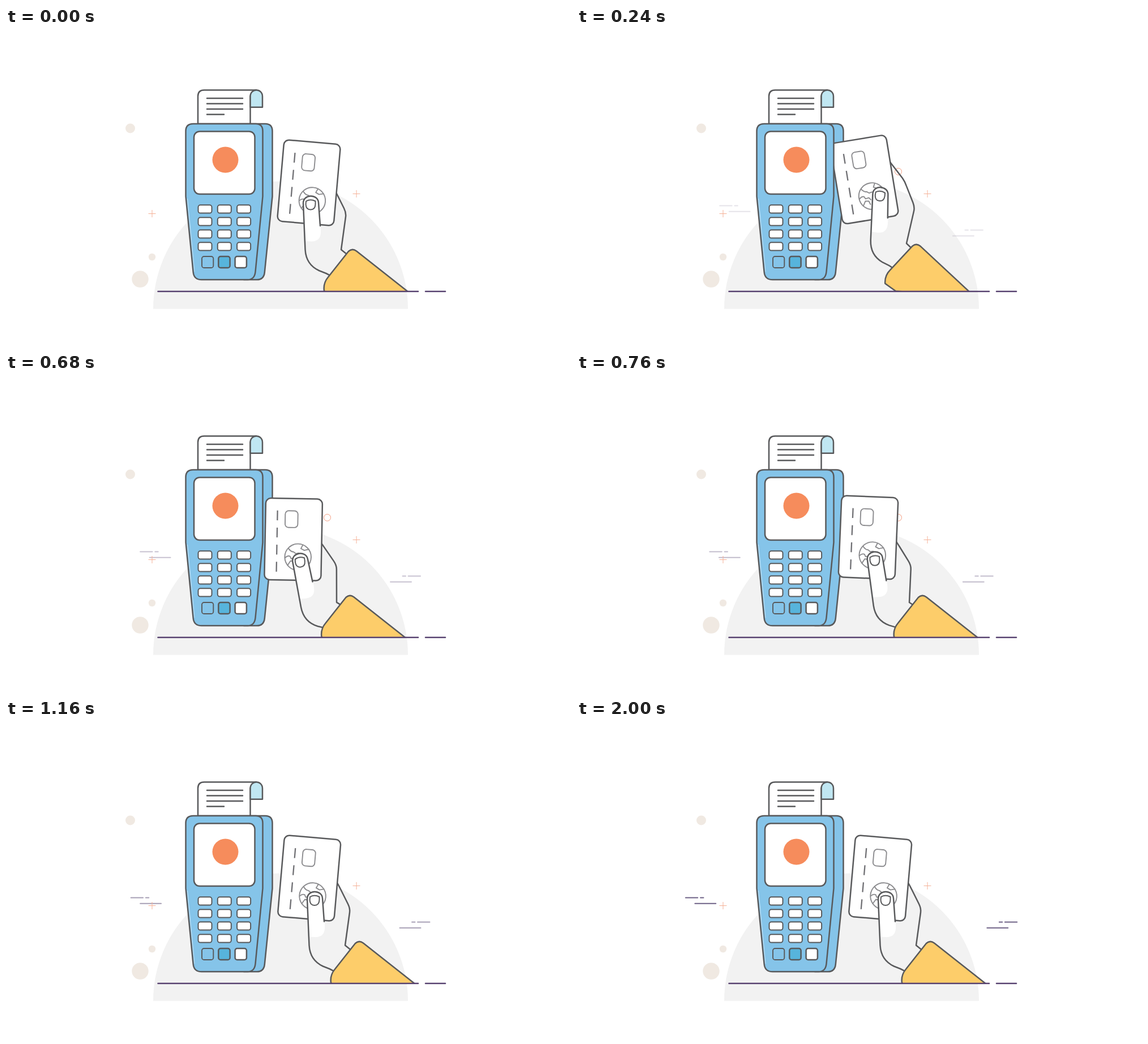
An HTML page for the animation above (2.04 s loop, 998 by 561 pixels).

```html
<!DOCTYPE html>
<html lang="en">
<head>
<meta charset="utf-8">
<title>Card payment</title>
<style>
  html, body { margin: 0; width: 100%; height: 100%; overflow: hidden; background: #fff; }
  svg { display: block; width: 100vw; height: 100vh; }
  .ink { stroke: #58595b; stroke-width: 2.5; stroke-linecap: round; stroke-linejoin: round; }
  .none { fill: none; }
  .white { fill: #fff; }
  .blue { fill: #85c4e9; }
  .soft { fill: none; stroke: #8b8b8e; stroke-width: 1.9; stroke-linecap: round; stroke-linejoin: round; }
  .speed { fill: none; stroke: #5f5079; stroke-width: 1.9; stroke-linecap: round; }
</style>
</head>
<body>
<svg viewBox="0 0 998 561" xmlns="http://www.w3.org/2000/svg">
  <defs>
    <clipPath id="aboveGround"><rect width="998" height="464.5"/></clipPath>
  </defs>

  <path d="M260 495.5A225 225 0 0 1 710 495.5Z" fill="#f2f2f2"/>
  <g fill="#f0e9e2">
    <circle cx="219.5" cy="177" r="8.5"/>
    <circle cx="258" cy="404" r="6.2"/>
    <circle cx="237" cy="443" r="14.7"/>
  </g>
  <path class="speed" id="speedLeft" d="M191.8 313.5h21.5M218 313.5h5.5M208.3 323.7h37"/>
  <path class="speed" id="speedRight" d="M745.8 356.5h5.5M755.8 356.5h21.5M724.3 366.7h37"/>
  <path d="M251.5 327.5h13M258 321v13M612.5 292.5h13M619 286v13" stroke="#f5b197" fill="none"/>
  <circle cx="567.5" cy="253.3" r="6" stroke="#f49c7f" fill="none"/>
  <path d="M536 293q6 2 9-1" stroke="#3f74a5" stroke-width="2" fill="none"/>

  <path class="ink blue" d="M430 169H458Q470.5 169 470.5 182V297L456.8 431Q455.5 444 443 444H420Z"/>

  <g id="palm">
    <path class="ink none" d="M551 251L575 277Q580 283 583 290L597 318Q601 326 600 333L592 391L602 399"/>
  </g>
  <g id="card">
    <rect class="ink white" x="-50" y="-72" width="100" height="144" rx="9"/>
    <path d="M-29 -50.5V58" fill="none" stroke="#6f6f73" stroke-width="2.3" stroke-dasharray="17.4 12.8"/>
    <rect class="soft" x="-15.2" y="-50.3" width="22.4" height="29.4" rx="6"/>
    <g transform="translate(8.6 31)">
      <circle class="soft" r="23.3" stroke-width="2.2"/>
      <path class="soft" d="M-17 -15q4 6 9 6l4 3 5 -1M-23 2q5 -5 9 -3l2 4 6 -1 3 4M-18 15l5 -8 6 1 2 6M8 -21l-3 6 6 3 8 -2"/>
    </g>
  </g>
  <g id="thumb">
    <path class="white" d="M525 309C525 292.500 551 292.500 552 308L556 350V360Q556 376 540 376.500L528 376Z"/>
    <path class="ink none" d="M577 439Q565 432 553 428C538 421 529.500 409 528.500 391L525 309C525 292.500 551 292.500 552 308L555 349"/>
    <path class="ink none" style="stroke-width:2" d="M530 305.500Q538 301 546.500 305.500V311Q546 320.500 538 320.500Q530 320.500 529.500 311Z"/>
  </g>
  <g clip-path="url(#aboveGround)">
    <path id="sleeve" class="ink" fill="#fdcd6a" d="M605 394L569 439.500Q560 450 562 464L582 476 725 477 619 393.500Q611.500 388 605 394Z"/>
  </g>

  <path class="ink white" d="M339 169V120.500Q339 109.500 350 109.500H442L431.500 120V169Z"/>
  <path class="ink" fill="#c0e7f2" d="M431.500 139.800V121C431.500 105.800 453 105.800 453 121V139.800Z"/>
  <path class="ink none" d="M355 124h63M355 133.500h63M355 143h63M355 152.500h30"/>
  <path class="ink blue" d="M330.500 169H441Q453.500 169 453.500 182V297L440.500 430Q439 444 427 444H345.500Q332 444 330.700 431L317.500 297V182Q317.500 169 330.500 169Z"/>
  <path d="M320.500 301L333 430" stroke="#c4e2f4" fill="none"/>
  <rect class="ink white" x="332" y="182.500" width="107.500" height="110.500" rx="10"/>
  <circle cx="387.500" cy="232.500" r="23" fill="#f68c5c"/>
  <g id="keys"></g>

  <path d="M268.500 464.700H728M741 464.700H776" fill="none" stroke="#5b4673" stroke-width="2.600" stroke-linecap="round"/>
</svg>
<script>
const LOOP = 2040, STEP = 40;
const byId = id => document.getElementById(id);

function addKey(x, y, w, h, fill, line) {
  const key = document.createElementNS("http://www.w3.org/2000/svg", "rect");
  const attrs = { x, y, width: w, height: h, rx: 3.8, fill, class: "ink", style: `stroke-width:${line}` };
  for (const name in attrs) key.setAttribute(name, attrs[name]);
  byId("keys").append(key);
}
for (let row = 0; row < 4; row++)
  for (let col = 0; col < 3; col++)
    addKey(339.5 + col * 34.3, 312.3 + row * 22, 24, 14.3, "#fff", 2);
["#85c4e9", "#57b4dc", "#fff"].forEach((fill, i) =>
  addKey(346 + i * 29.3, 403, 20.3, 20, fill, i ? 2.5 : 1.9));

const times = [0, 240, 400, 760, 960, 1160];
const poses = {
  card: {
    x: [535, 507.6, 488.8, 514.5, 530, 535.7],
    y: [273, 267.3, 299, 288.3, 271.5, 279],
    turn: [5, -9.3, -4.6, 2.4, 5, 5]
  },
  hand: {
    x: [0, -10, -15, -5, 5, 7],
    y: [0, -11, 9.5, 12, -1, 6.5],
    turn: [0, 5, -16.5, -5.2, 0, 0]
  },
  sleeve: {
    x: [0, -12, -10.7, -2, 8, 12],
    y: [0, -9, 0, 0, 0, 0],
    turn: [0, 4.7, 0, 0, 0, 0]
  }
};

// Monotone cubic through the key poses, at rest on both ends.
function sample(values, t) {
  const last = times.length - 1;
  if (t >= times[last]) return values[last];
  const slope = i => (values[i + 1] - values[i]) / (times[i + 1] - times[i]);
  const tangent = i => {
    if (i === 0 || i === last) return 0;
    const a = slope(i - 1), b = slope(i);
    return a * b <= 0 ? 0 : 2 * a * b / (a + b);
  };
  const i = times.findIndex((start, k) => t >= start && t < times[k + 1]);
  const span = times[i + 1] - times[i], u = (t - times[i]) / span, v = 1 - u;
  return values[i] * v * v * (1 + 2 * u) + values[i + 1] * u * u * (3 - 2 * u)
    + span * u * v * (tangent(i) * v - tangent(i + 1) * u);
}

function place(id, pose, t, px = 0, py = 0) {
  const [x, y, turn] = [pose.x, pose.y, pose.turn].map(values => sample(values, t));
  byId(id).setAttribute("transform", `translate(${x} ${y}) rotate(${turn} ${px} ${py})`);
}

function slide(id, dx, opacity) {
  byId(id).setAttribute("transform", `translate(${dx} 0)`);
  byId(id).setAttribute("opacity", opacity);
}

function draw(ms) {
  let t = Math.floor((ms % LOOP) / STEP) * STEP;
  if (t < 2 * STEP) t = 0;
  place("card", poses.card, t);
  place("palm", poses.hand, t, 592, 391);
  place("thumb", poses.hand, t, 592, 391);
  place("sleeve", poses.sleeve, t, 612, 391);
  const drift = (2000 - t) * 0.0343, shown = t && 0.06 + 0.84 * t / 2000;
  slide("speedLeft", drift, shown);
  slide("speedRight", -drift, shown);
}

const begin = performance.now();
function tick() {
  draw(performance.now() - begin);
  requestAnimationFrame(tick);
}
tick();
</script>
</body>
</html>
```
